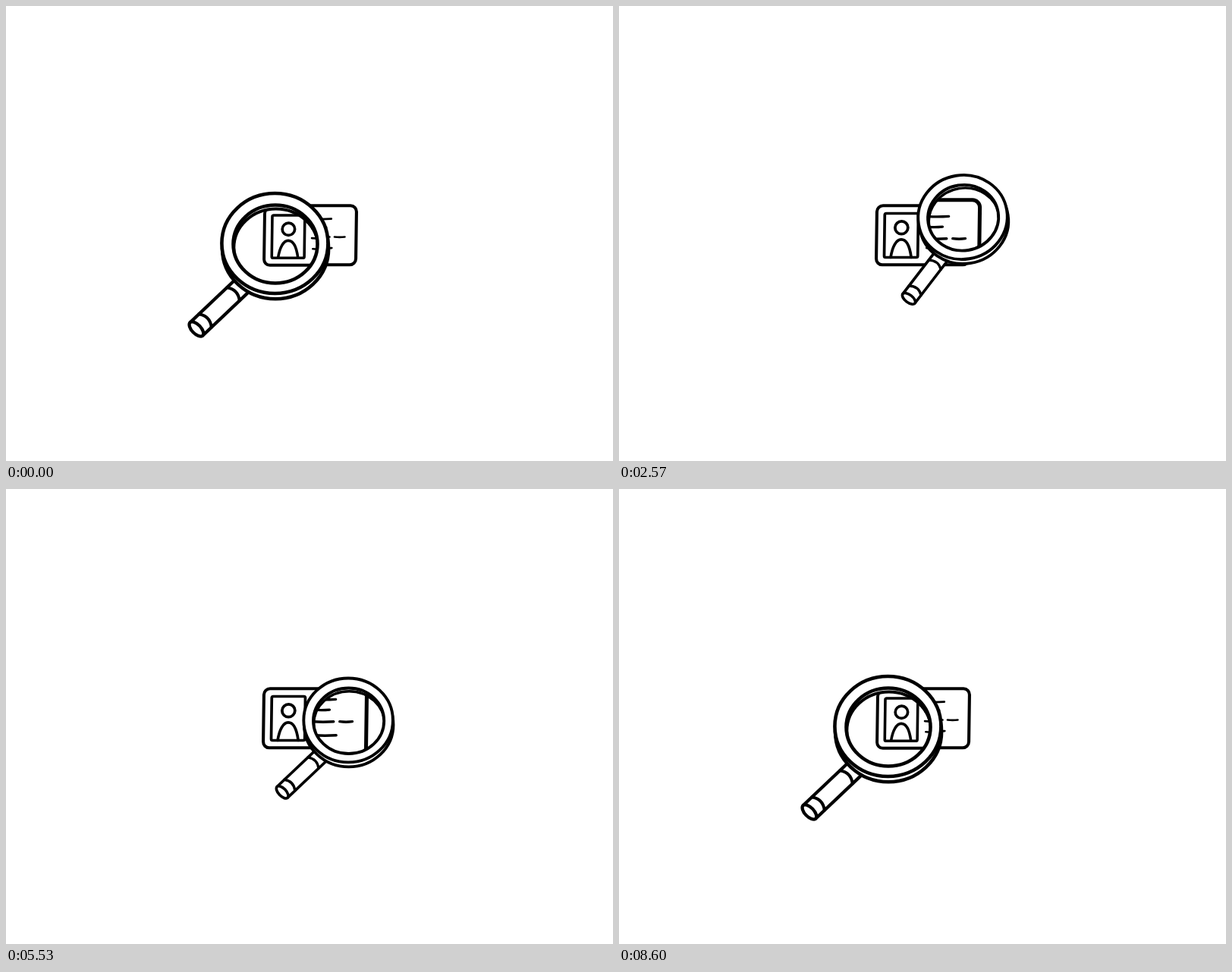
An HTML page with a canvas that plays this animation: 800 px wide and 600 px high, repeating every 8630 ms.

```html
<!DOCTYPE html>
<html lang="en">
<head>
<meta charset="utf-8">
<title>Card search</title>
<style>
html, body { margin: 0; width: 100%; height: 100%; overflow: hidden; background: #fff; }
canvas { display: block; }
</style>
</head>
<body>
<canvas id="stage" width="800" height="600"></canvas>
<script>
const ctx = document.getElementById('stage').getContext('2d');
const LOOP = 8630;
const STEP = 861;
const SMALL = 0.84;
const LEFT = 355, RIGHT = 453, TOP = 272, UPPER = 278.5, LOW = 322;

const rest = { x: 354.4, y: 313, scale: 1, turn: 0 };
const near = (x, y, turn = 0) => ({ x, y, scale: SMALL, turn });

// The glass shrinks, sweeps twice over the card, then returns to rest.
const route = [
  rest,
  near(LEFT, TOP),
  near(RIGHT, UPPER, -9),
  near(RIGHT - 4, LOW + 1, 5),
  near(LEFT, 330),
  near(RIGHT - 3, LOW - 1.5),
  near(RIGHT, UPPER),
  near(LEFT - 2, TOP, -2),
  near(LEFT - 2, 286.5),
  rest
];
const first = 1700, sweepEnd = first + 6 * STEP;
const times = [0, ...Array.from({ length: 7 }, (_, i) => first + i * STEP),
               sweepEnd + 270, LOOP];

const mix = (a, b, u) => a + (b - a) * u;
const ease = u => u < 0.5 ? (2 * u) ** 2.8 / 2 : 1 - (2 - 2 * u) ** 2.8 / 2;

function poseAt(t) {
  const i = times.findIndex(end => t < end);
  const u = ease((t - times[i - 1]) / (times[i] - times[i - 1]));
  const a = route[i - 1], b = route[i], pose = {};
  for (const key in a) pose[key] = mix(a[key], b[key], u);
  return pose;
}

function outline(path, width, filled) {
  ctx.lineWidth = width;
  if (filled) ctx.fill(path);
  ctx.stroke(path);
}

function ellipse(x, y, rx, ry) {
  const p = new Path2D();
  p.ellipse(x, y, rx, ry, 0, 0, Math.PI * 2);
  return p;
}

function box(x, y, w, h, r) {
  const p = new Path2D();
  p.roundRect(x, y, w, h, r);
  return p;
}

// Drawn around the card's centre, with a slight hand-drawn slant.
function drawCard() {
  ctx.save();
  ctx.transform(1, 0, -0.014, 1, 0, 0);
  outline(box(-61, -39, 122, 78, 8), 4.1);
  outline(box(-50.6, -28.8, 44.2, 58, 2), 3.7);
  outline(ellipse(-28.3, -10, 8.5, 8.4), 3.8);
  outline(new Path2D('M-42 29 C-40 15 -35 5.5 -28.5 5.5 C-21 5.5 -17 15 -15 29'), 3.7);
  const lines = new Path2D();
  for (const [x, y, w] of [[3, -21.6, 25], [4, -10.4, 17.5], [3.5, 2.2, 22.5],
                           [32.5, 2.2, 13.5], [5, 16.8, 24]]) {
    lines.moveTo(x, y);
    lines.quadraticCurveTo(x + w / 2, y + 0.8, x + w, y);
  }
  outline(lines, 2.7);
  ctx.restore();
}

// The handle's x axis runs from its tip to the ring.
function drawHandle() {
  ctx.save();
  ctx.translate(-103.5, 113);
  ctx.rotate(-43.5 * Math.PI / 180);
  outline(box(0, -12, 92, 24, 0), 4.3, true);
  outline(ellipse(0, 0, 6, 12), 4.3, true);
  const bands = new Path2D();
  for (const x of [16, 67]) {
    bands.moveTo(x, -12);
    bands.quadraticCurveTo(x + 9, 0, x, 12);
  }
  outline(bands, 4);
  ctx.restore();
}

function drawGlass({ x, y, scale, turn }) {
  const zoom = mix(0.97, 1.235, (1 - scale) / (1 - SMALL));
  const angle = turn * Math.PI / 180;
  const hole = ellipse(0.6, 1, 55.5, 51.5);
  const rim = ellipse(1.4, 6, 55.5, 51.5);

  ctx.save();
  ctx.translate(x, y);
  ctx.rotate(angle);
  ctx.scale(scale, scale);
  drawHandle();
  outline(ellipse(0.7, 7.2, 70, 66), 4.6, true);
  outline(ellipse(0, 0, 70, 66), 4.6, true);

  ctx.save();
  ctx.clip(hole);
  ctx.save();
  ctx.clip(rim);
  ctx.scale(1 / scale, 1 / scale);
  ctx.rotate(-angle);
  ctx.translate(399.7 - x, 304 - y);
  ctx.scale(zoom, zoom);
  drawCard();
  ctx.restore();
  outline(rim, 4);
  ctx.restore();

  outline(hole, 4.6);
  ctx.restore();
}

function draw(t) {
  ctx.fillStyle = '#fff';
  ctx.strokeStyle = '#000';
  ctx.lineCap = ctx.lineJoin = 'round';
  ctx.fillRect(0, 0, 800, 600);
  ctx.save();
  ctx.translate(400.5, 302.3);
  drawCard();
  ctx.restore();
  drawGlass(poseAt(t));
}

const start = performance.now();
function tick() {
  draw((performance.now() - start) % LOOP);
  requestAnimationFrame(tick);
}
tick();
</script>
</body>
</html>
```
